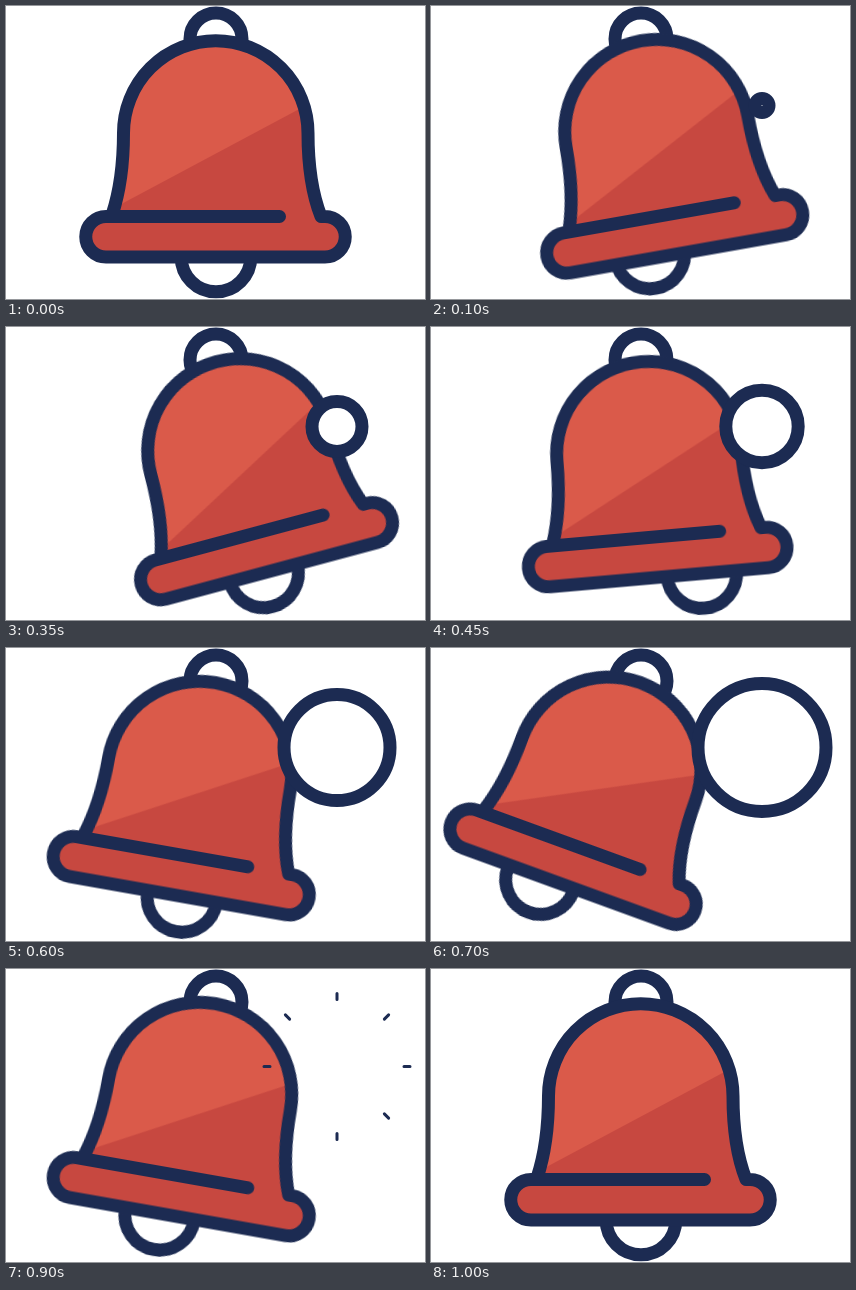
Write an HTML page that moves like this. It is 419x293 px and loops after 1.05 s.

```html
<!DOCTYPE html>
<html lang="en">
<head>
<meta charset="utf-8">
<title>Ringing bell</title>
<style>
  html, body { margin: 0; width: 100%; height: 100%; overflow: hidden; background: #fff; }
  svg { display: block; width: 419px; height: 293px; }

  .ink { stroke: #1c2b52; stroke-width: 13; stroke-linecap: round; stroke-linejoin: round; }
  .hollow { fill: #fff; }
  .line { fill: none; }
  .shade { fill: #c74840; }
  .light { fill: #da5a4a; }

  /* Each keyframe holds in 50 ms steps; the small lead keeps steps clear of rounding. */
  .bell, .clapper, .bubble, .rays { animation: 1050ms -2ms infinite; }
  .bell { transform-origin: 210px 33.5px; animation-name: swing; }
  .clapper { animation-name: knock; }
  .bubble { animation-name: grow; }
  .rays { animation-name: burst; }

  @keyframes swing {
    0% { transform: rotate(0deg); animation-timing-function: steps(5); }
    23.81% { transform: rotate(-25deg); animation-timing-function: steps(10); }
    71.429% { transform: rotate(25deg); animation-timing-function: steps(5); }
    95.238%, 100% { transform: rotate(0deg); }
  }
  @keyframes knock {
    0% { transform: translate(0px, 0px); animation-timing-function: steps(4); }
    19.048% { transform: translate(-57px, -9.5px); animation-timing-function: steps(1); }
    23.81% { transform: translate(-59px, -8.5px); animation-timing-function: steps(2); }
    33.333% { transform: translate(-9px, 0px); animation-timing-function: steps(2); }
    42.857% { transform: translate(42px, 0px); animation-timing-function: steps(3); }
    57.143% { transform: translate(4px, 1px); animation-timing-function: steps(3); }
    71.429% { transform: translate(-42px, 4px); animation-timing-function: steps(1); }
    76.19% { transform: translate(-37px, 3.5px); animation-timing-function: steps(4); }
    95.238%, 100% { transform: translate(0px, 0px); }
  }
  @keyframes grow {
    0% { r: 0px; opacity: 0; animation-timing-function: steps(1); }
    4.762% { r: 3.5px; opacity: 1; animation-timing-function: steps(3); }
    19.048% { r: 14px; opacity: 1; animation-timing-function: steps(3); }
    33.333% { r: 25px; opacity: 1; animation-timing-function: steps(5); }
    57.143% { r: 53px; opacity: 1; animation-timing-function: steps(2); }
    66.667% { r: 64px; opacity: 1; animation-timing-function: steps(1); }
    71.429%, 100% { r: 0px; opacity: 0; }
  }
  @keyframes burst {
    0% { opacity: 0; animation-timing-function: steps(1); }
    71.429% { opacity: 1; stroke-width: 10px; stroke-dasharray: 22px 200px; stroke-dashoffset: -48px; animation-timing-function: steps(1); }
    76.19% { opacity: 1; stroke-width: 8px; stroke-dasharray: 18px 200px; stroke-dashoffset: -53.5px; animation-timing-function: steps(2); }
    85.714% { opacity: 1; stroke-width: 3px; stroke-dasharray: 6px 200px; stroke-dashoffset: -67px; animation-timing-function: steps(1); }
    90.476%, 100% { opacity: 0; }
  }
</style>
</head>
<body>
<svg viewBox="0 0 419 293">
  <circle class="ink hollow" cx="210" cy="33" r="26"/>
  <g class="bell">
    <circle class="ink hollow clapper" cx="210" cy="251" r="34.8"/>
    <path class="shade" d="M106 210.5C113 188 117.5 160 117.5 127a92.25 92.25 0 0 1 184.5 0C302 160 307 190 315 210.5H319a20.25 20.25 0 0 1 0 40.5H100a20.25 20.25 0 0 1 0-40.5Z"/>
    <path class="light" d="M107 202.5C113 182 117.5 160 117.5 127A92.25 92.25 0 0 1 298 100.5Z"/>
    <path class="ink line" d="M106 209C113 188 117.5 160 117.5 127a92.25 92.25 0 0 1 184.5 0C302 160 307 190 315 210.5H319a20.25 20.25 0 0 1 0 40.5H100a20.25 20.25 0 0 1 0-40.5H273.5"/>
  </g>
  <circle class="ink hollow bubble" cx="331" cy="99.5" r="0"/>
  <path class="ink line rays" d="M331 97.5h80M331 97.5h-80M331 97.5v80M331 97.5v-80M331 97.5l57 57M331 97.5l57-57M331 97.5l-57 57M331 97.5l-57-57"/>
</svg>
</body>
</html>
```
